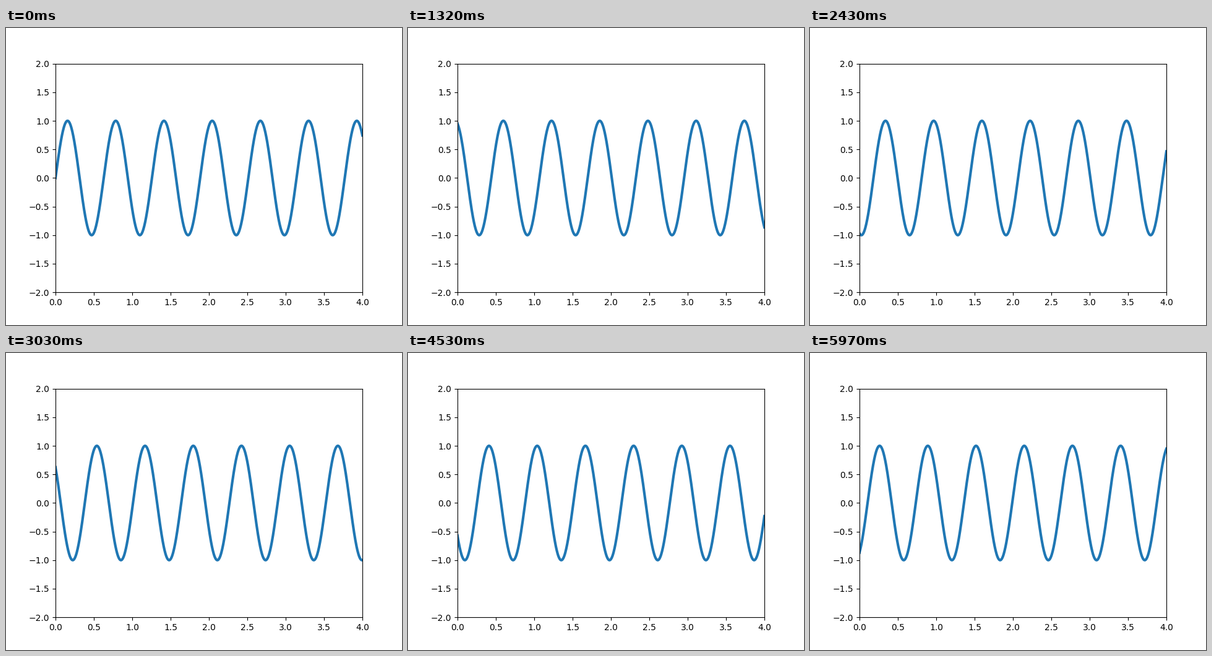
Recreate the animation shown at these times as a matplotlib script. Size 640 by 480 pixels, loop 6 s.

```python
import matplotlib.pyplot as plt
import numpy as np
from matplotlib.animation import FuncAnimation

FRAMES = 200
INTERVAL = 30  # ms
WAVENUMBER = 10
PHASE_STEP = 0.1

fig = plt.figure(figsize=(6.4, 4.8), dpi=100)
ax = fig.add_subplot(xlim=(0, 4), ylim=(-2, 2))
x = np.linspace(0, 4, 1000)
line, = ax.plot([], [], lw=3)


def update(i):
    line.set_data(x, np.sin(WAVENUMBER * x - PHASE_STEP * i))
    return line,


anim = FuncAnimation(fig, update, frames=FRAMES, interval=INTERVAL,
                     repeat=True, repeat_delay=0, blit=False)
plt.show()
```
